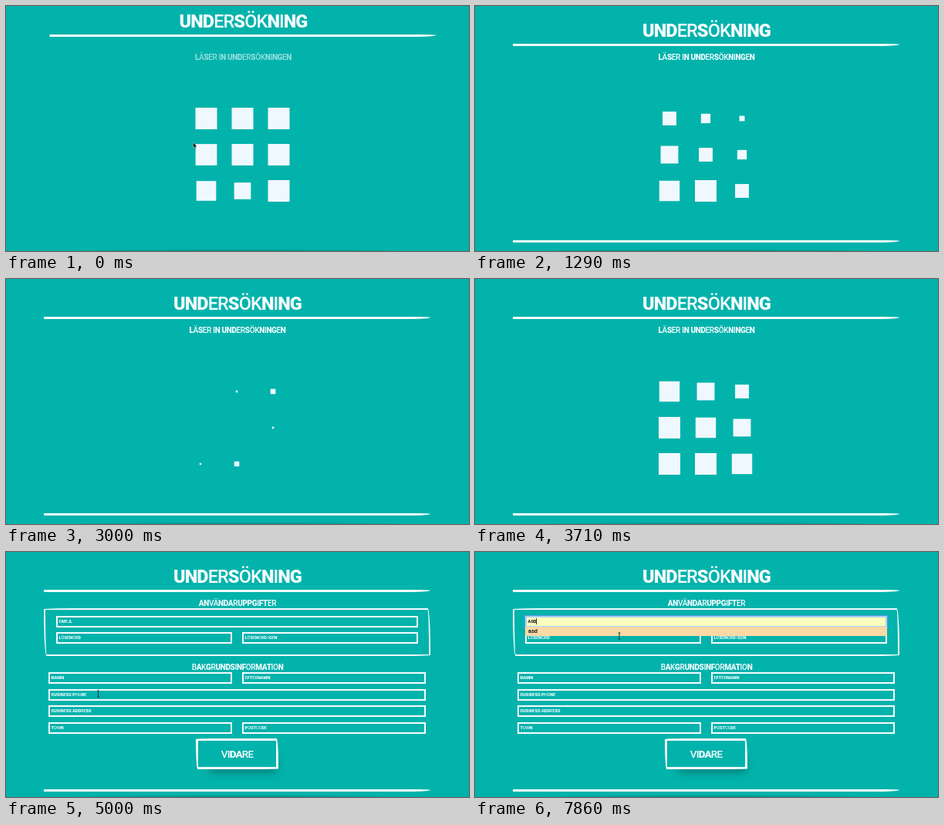
An HTML page that plays this animation: 600x318 px, repeating every 8 s.

```html
<!DOCTYPE html>
<html lang="sv">
<head>
<meta charset="utf-8">
<title>Undersökning</title>
<style>
  html, body { margin: 0; width: 100%; height: 100%; overflow: hidden; background: #02b3ab; }
  #stage { position: relative; width: 600px; height: 318px; overflow: hidden; background: #02b3ab;
    color: #f4fbff; font-family: Roboto, sans-serif; }
  #stage div, #stage svg { position: absolute; box-sizing: border-box; white-space: nowrap; }
  #loader, #form { inset: 0; }
  .text { left: 0; width: 600px; text-align: center; }
  .title { font-size: 23.5px; letter-spacing: -.9px; line-height: 24px; }
  .heading { font-size: 10px; letter-spacing: -.35px; line-height: 12px; }
  .rule { left: 49px; width: 501px; height: 3px; background: #f4fbff; border-radius: 1px 35px 30px 1px / 1px 1px 3px 1px; }
  .cube { width: 28px; height: 28px; background: #f0f8ff; }
  .sketch { border: 2px solid #f4fbff; border-radius: 255px 15px 225px 15px / 5px 225px 5px 255px; }
  .field { border: 2px solid #f4fbff; padding-left: 1.6px; font-size: 5.7px; letter-spacing: -.1px; line-height: 11px; }
  .button { border-width: 3px; font-size: 13.5px; letter-spacing: -.8px; line-height: 34px; text-align: center;
    box-shadow: 8px 14px 12px -10px rgba(0, 0, 0, .3); }
  .focus { border-color: #a9d4f5; box-shadow: 0 0 1px 1px #4b9ce0; }
  .filled { background: #faffbd; color: #222; }
  #option { left: 65px; top: 97px; width: 469px; height: 12px; padding-left: 4px; color: #111;
    font: bold 7px/12px "Liberation Sans", sans-serif; }
  #caret { top: 86px; width: 1px; height: 8px; background: #333; }
  #shade { left: 80px; top: 316px; width: 440px; height: 6px; border-radius: 50%; background: #067c78; opacity: .45; }
</style>
</head>
<body>
<div id="stage"></div>
<script>
const stage = document.getElementById('stage');

function add(parent, className, style = {}, text = '') {
  const el = document.createElement('div');
  el.className = className;
  for (const key in style) el.style[key] = typeof style[key] === 'number' ? style[key] + 'px' : style[key];
  letter(el, text);
  parent.append(el);
  return el;
}

// Uneven lettering: some capitals heavy, the others light.
function letter(el, text) {
  el.replaceChildren(...[...text].map(char => {
    const span = document.createElement('span');
    span.textContent = char;
    span.style.fontWeight = 'UNDGSAMLTFP'.includes(char) ? 900 : 500;
    return span;
  }));
}

const title = add(stage, 'text title', { top: 20 }, 'UNDERSÖKNING');
const topRule = add(stage, 'rule', { top: 48.5 });
const bottomRule = add(stage, 'rule');
add(stage, '').id = 'shade';

const loader = add(stage, '');
loader.id = 'loader';
const loadingText = add(loader, 'text heading', { top: 61 }, 'LÄSER IN UNDERSÖKNINGEN');
const cubeDelays = [3, 4, 5, 2, 3, 4, 1, 0, 3];
const cubes = cubeDelays.map((_, i) =>
  add(loader, 'cube', { left: 237.5 + i % 3 * 47, top: 131.5 + Math.floor(i / 3) * 47 }));

const form = add(stage, '');
form.id = 'form';
const field = (left, top, width, text) => add(form, 'field', { left, top, width, height: 15 }, text);
add(form, 'text heading', { top: 61 }, 'ANVÄNDARUPPGIFTER');
add(form, 'sketch', { left: 49, top: 73, width: 501, height: 62 });
const email = field(65, 82.5, 469, 'EMEJL');
field(65, 104, 228, 'LÖSENORD');
field(306, 104, 228, 'LÖSENORD IGEN');
add(form, 'text heading', { top: 144 }, 'BAKGRUNDSINFORMATION');
field(55, 156, 238, 'NAMN');
field(306, 156, 238, 'EFTERNAMN');
field(55, 177.5, 489, 'BUSINESS PHONE');
field(55, 199, 489, 'BUSINESS ADDRESS');
field(55, 220.5, 238, 'TOWN');
field(306, 220.5, 238, 'POSTCODE');
add(form, 'sketch button', { left: 246, top: 242, width: 107, height: 40 }, 'VIDARE');
const option = add(form, '');
option.id = 'option';
option.textContent = 'asd';
const caret = add(form, '');
caret.id = 'caret';

stage.insertAdjacentHTML('beforeend', `
  <svg width="600" height="318" style="left:0;top:0">
    <path id="arrow" d="M0 0V7L1.7 5.6L2.8 8L4 7.4L3 5.2H5Z" fill="#111" stroke="#dff" stroke-width=".4"/>
    <path id="beam" d="M-1.5 -4H1.5M0 -4V4M-1.5 4H1.5" fill="none" stroke="#153f40"/>
  </svg>`);
const arrow = document.getElementById('arrow');
const beam = document.getElementById('beam');

const show = (el, on) => { el.style.display = on ? '' : 'none'; };
const clamp = x => Math.min(1, Math.max(0, x));
const ease = x => (1 - Math.cos(Math.PI * x)) / 2;

function cubeScale(t) {
  const phase = (t / 2220 + 1) % 1;
  return phase < .7 ? ease(Math.abs(phase / .35 - 1)) : 1;
}

// Stops of the pointer: time, x, y.
const pointerPath = [[4430, 2, 200], [4710, 42, 190], [5000, 119.5, 184], [5700, 130, 178],
  [6600, 190, 84], [7200, 190, 84], [7570, 187, 109], [8000, 187, 109]];

function pointerAt(t) {
  const i = Math.max(1, pointerPath.findIndex(stop => stop[0] > t));
  const [t0, x0, y0] = pointerPath[i - 1], [t1, x1, y1] = pointerPath[i];
  const k = ease(clamp((t - t0) / (t1 - t0)));
  return [x0 + (x1 - x0) * k, y0 + (y1 - y0) * k];
}

let typed = null;
function draw(t) {
  const first = t < 140;
  const formOn = t >= 4290;
  const dx = first ? 7.5 : 0;
  const dy = first ? -12 : -12 * Math.exp((140 - t) / 205);
  title.style.transform = topRule.style.transform = `translate(${dx}px, ${dy}px)`;
  show(bottomRule, !first);
  bottomRule.style.top = (formOn ? 308 : 304) + 'px';

  show(loader, !formOn);
  loader.style.transform = `translateX(${dx}px)`;
  loadingText.style.opacity = first ? .6 : .6 + .4 * clamp((t - 140) / 280);
  cubes.forEach((cube, i) => { cube.style.transform = `scale(${cubeScale(t + 244 - 100 * cubeDelays[i])})`; });

  show(form, formOn);
  form.style.opacity = clamp((t - 4150) / 420);
  const focused = t >= 6860, filled = t >= 7570;
  email.classList.toggle('focus', focused);
  email.classList.toggle('filled', filled);
  const value = filled ? 'ASD' : t >= 7290 ? 'A' : 'EMEJL';
  if (value !== typed) letter(email, typed = value);
  email.style.color = focused && value === 'EMEJL' ? '#c3e3ee' : '';
  show(option, t >= 7430);
  option.style.background = filled ? '#fbd9a5' : '#fff';
  show(caret, focused);
  caret.style.left = (filled ? 79 : value === 'A' ? 72 : 68) + 'px';

  const [x, y] = t < 1290 ? [242.5, 177] : pointerAt(t);
  const overText = t >= 4850;
  show(arrow, t < 1290 || t >= 4430 && !overText);
  show(beam, overText);
  (overText ? beam : arrow).setAttribute('transform', `translate(${x} ${y})`);
}

function tick() {
  draw(performance.now() % 8000);
  requestAnimationFrame(tick);
}
tick();
</script>
</body>
</html>
```
